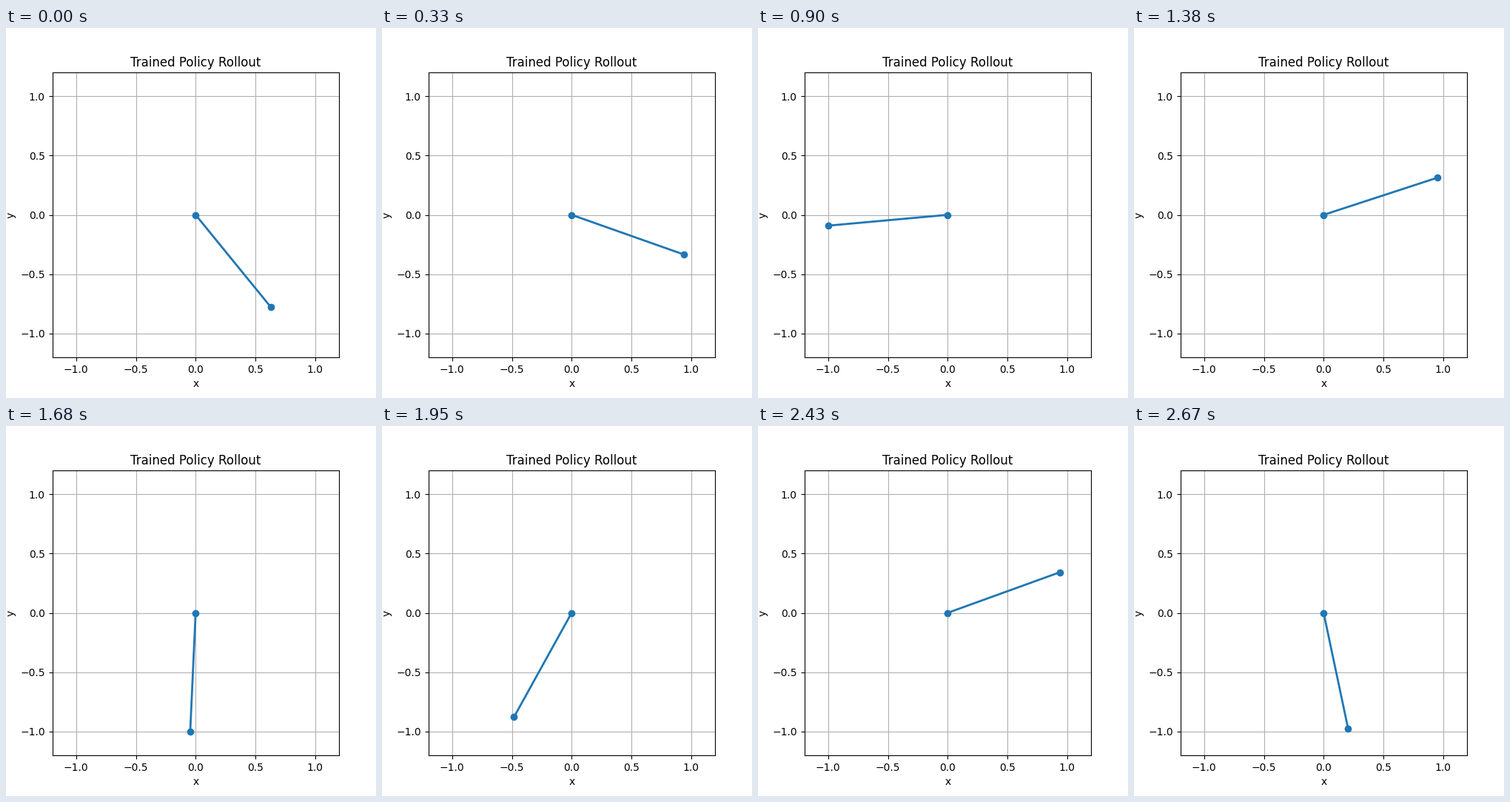
Recreate the animation shown at these times as a matplotlib script. Size 500 by 500 pixels, loop 2.7 s.

```python
import numpy as np
import matplotlib.pyplot as plt
from matplotlib.animation import FuncAnimation

STEPS = 90
INTERVAL = 30
GRAVITY = 0.0375  # angular gain per step squared

# A few poses: step -> degrees counter-clockwise from straight down.
POSES = {0: 39, 18: 140.7, 21: 181, 30: 275.2, 34: 285.4, 46: 108.2,
         54: 8.7, 56: -2.6, 73: -90.7, 78: -187.3, 89: -348.135}


def solve_rollout(weight=100, effort=0.2, rounds=40):
    """Pendulum swing from rest through the poses, with small, smooth torque."""
    at = np.array(list(POSES))
    goal = np.radians(list(POSES.values()))
    theta = np.interp(np.arange(STEPS), at, goal)

    eye = np.eye(STEPS)
    second = np.diff(eye, 2, axis=0)
    pins = weight * eye[at]
    start = eye[1:2] - eye[0:1]
    smooth = np.vstack([np.diff(np.eye(STEPS - 2), axis=0),
                        effort * np.eye(STEPS - 2)])

    for _ in range(rounds):
        torque = second @ theta - GRAVITY * np.sin(theta[1:-1])
        slope = second - GRAVITY * np.cos(theta[1:-1, None]) * eye[1:-1]
        error = np.concatenate([smooth @ torque, start @ theta,
                                pins @ theta - weight * goal])
        jacobian = np.vstack([smooth @ slope, start, pins])
        theta = theta - np.linalg.lstsq(jacobian, error, rcond=None)[0]
    return theta


angles = solve_rollout()

fig, ax = plt.subplots(figsize=(5, 5), dpi=100)
ax.set_xlim(-1.2, 1.2)
ax.set_ylim(-1.2, 1.2)
ax.set_xlabel("x")
ax.set_ylabel("y")
ax.set_title("Trained Policy Rollout")
ax.grid(True)
rod, = ax.plot([], [], "o-", lw=2)


def update(step):
    theta = angles[step]
    rod.set_data([0, np.sin(theta)], [0, -np.cos(theta)])
    return rod,


anim = FuncAnimation(fig, update, frames=STEPS, interval=INTERVAL,
                     repeat=True, repeat_delay=0)
plt.show()
```
